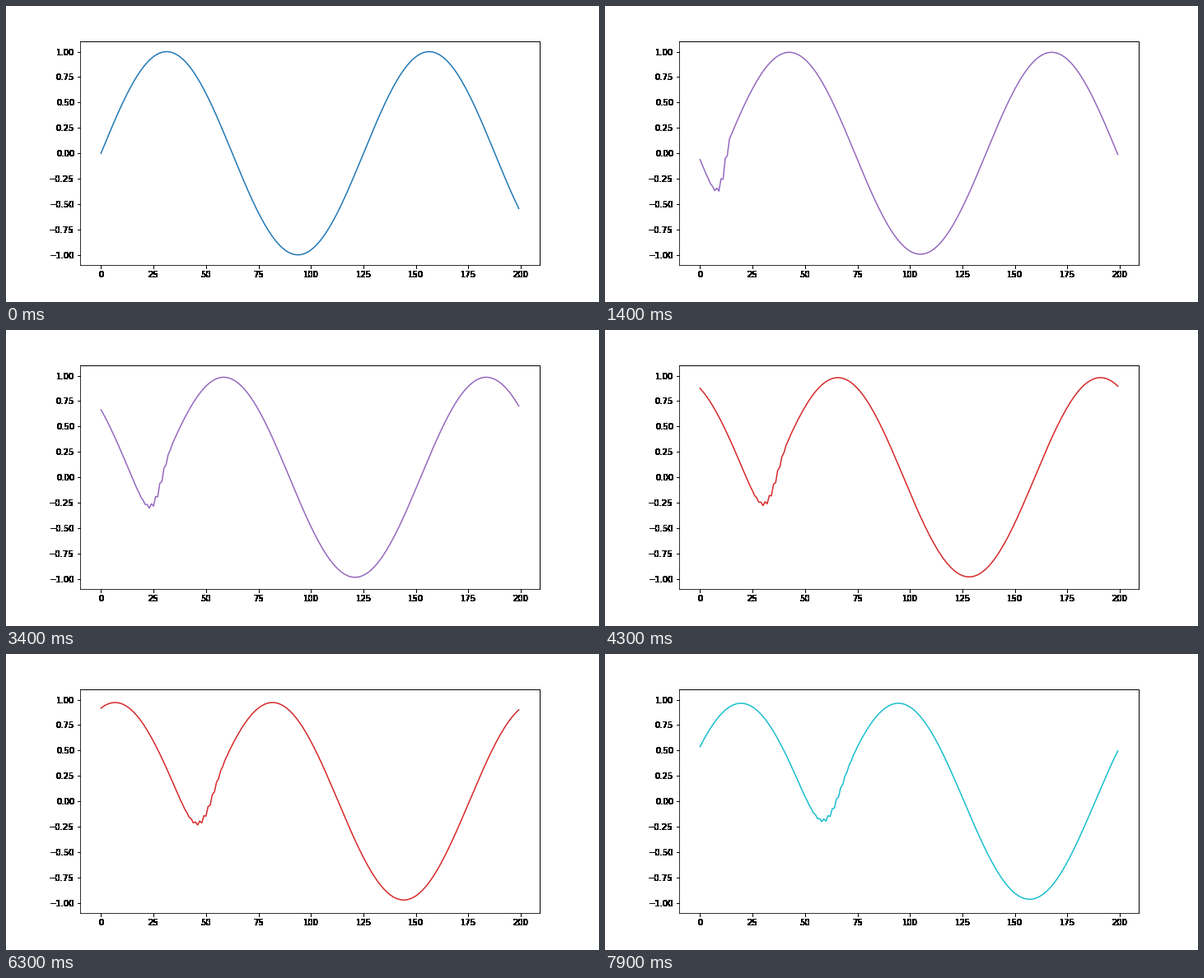
Recreate the animation shown at these times as a matplotlib script. Size 720 by 360 pixels, loop 8 s.

```python
import numpy as np
import matplotlib.pyplot as plt
from matplotlib.animation import ArtistAnimation

FRAMES = 80
COURANT = 0.8


def advect(u):
    """One Lax-Friedrichs step on a periodic grid."""
    left, right = np.roll(u, 1), np.roll(u, -1)
    return (left + right) / 2 - COURANT / 2 * (right - left)


def harden(image, dpi):
    """Turn soft edges into solid pixels."""
    image[..., 3] = image[..., 3] > 0
    return image, 0, 0


fig, ax = plt.subplots(figsize=(10, 5), dpi=72, facecolor="white")
fig.subplots_adjust(left=0.125, right=0.9, bottom=0.125, top=0.88)
for axis in (ax.xaxis, ax.yaxis):
    axis.set_agg_filter(harden)
for side in ("top", "right"):
    ax.spines[side].set_linewidth(1)

u = np.sin(np.linspace(0, 10, 200))
waves = []
for step in range(FRAMES):
    waves.append(ax.plot(u, color=f"C{step % 10}", lw=1.5))
    u = advect(u)

anim = ArtistAnimation(fig, waves, interval=100, repeat=True)
plt.show()
```
